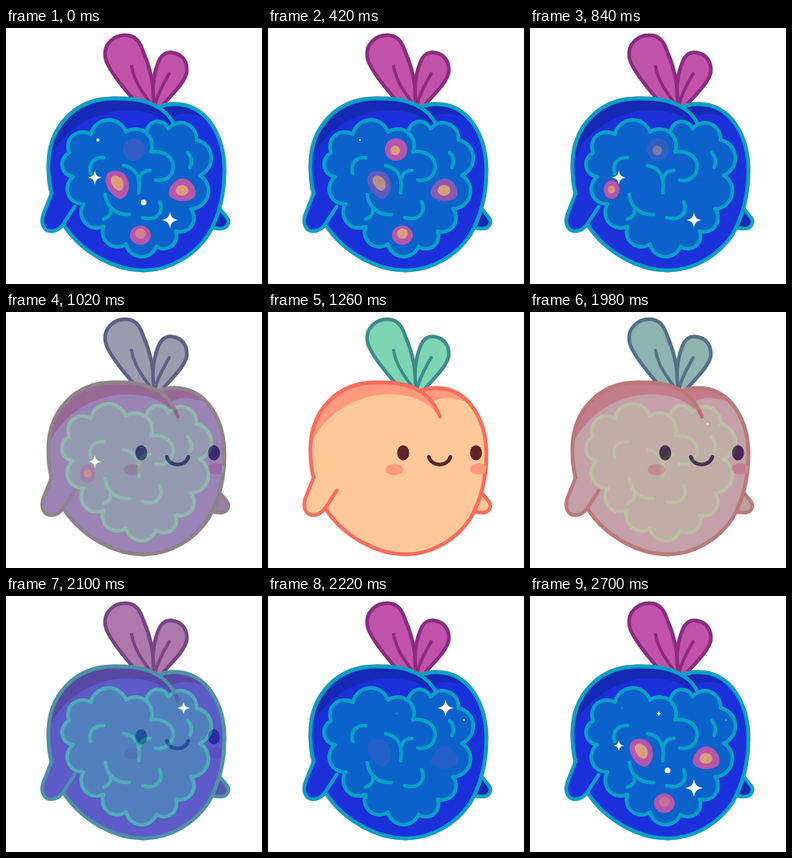
An HTML page that plays this animation: 320x320 px, repeating every 2760 ms.

```html
<!DOCTYPE html>
<html lang="en">
<head>
<meta charset="utf-8">
<title>Peach</title>
<style>
  html, body { margin: 0; width: 100%; height: 100%; overflow: hidden; background: #fff; }
  svg { display: block; width: 100vw; height: 100vh; }
  path { stroke-linecap: round; stroke-linejoin: round; }
</style>
</head>
<body>
<svg id="stage" viewBox="0 0 320 320"></svg>
<script>
const LOOP = 2760, STEP = 60;

const BODY = 'M190 99C172 88 152 88 135 88C85 88 53 125 53 172C53 185 54 196 57 207C60 225 66 238 72 246' +
  'C95 281 136 303 172 303C205 303 236 284 253 258C268 232 273 205 273 178C273 138 253 95 210 95C202 95 195 97 190 99Z';
const ARM = 'M57 207L47 232C42 246 49 254 56 254C63 254 67 251 71 246L86 223';
const FAR_ARM = 'M267 226C273 233 279 239 278 243C276 252 268 252 257 249';
const CREASE = 'M188 98C200 104 209 115 215 131';
const SHADE = 'M54 164C72 126 112 103 150 103C182 103 202 113 214 131L205 113C217 105 232 106 252 114L240 80L40 80Z';
const LEAF = 'M161 91C146 74 126 50 124 36C122 20 135 9 149 9C163 9 168 19 172 31C179 47 185 68 186 98';
const SIDE_LEAF = 'M186 98C182 80 184 60 190 44C194 33 201 29 209 31C221 33 227 43 226 55C223 69 208 82 197 95';
const VEINS = 'M157 48C160 66 170 80 183 97M204 57C198 68 190 80 186 97';
const FOLDS = 'M106 182C102 170 110 161 122 162M147 172C160 174 169 184 166 206M167 188C168 181 174 178 180 178' +
  'M124 208C126 226 140 234 154 233M131 227C131 234 128 237 122 239M192 217C198 230 188 242 171 237' +
  'M227 156C233 162 233 168 230 174';

// Round bumps between neighbouring points
function scallop(points) {
  return points.map(([x, y], i) => {
    if (!i) return `M${x} ${y}`;
    const r = Math.hypot(x - points[i - 1][0], y - points[i - 1][1]) * .52;
    return `A${r} ${r} 0 0 1 ${x} ${y}`;
  }).join('');
}
const BRAIN = scallop([[176, 128], [203, 126], [238, 140], [242, 184], [231, 226], [212, 254], [188, 273], [150, 270],
  [122, 248], [97, 220], [84, 186], [79, 156], [106, 133], [150, 130], [181, 155]]) +
  'C200 152 210 164 209 175C207 187 198 192 187 190';

const PEACH = { skin: '#ffc899', shade: '#ff9a7d', edge: '#f96c5c', leaf: '#7dd6b1', stem: '#3e8a8c', far: '#ffc899' };
const NIGHT = { skin: '#1b30da', shade: '#1529b6', edge: '#06a2c6', leaf: '#c153ab', stem: '#8e2a7e', far: '#1529b6' };
const RIM = '#b755ae', CORE = '#d89f7a', EYE = '#5c2426';

const path = (d, fill = 'none', stroke = 'none', w = 4.5) =>
  `<path d="${d}" fill="${fill}" stroke="${stroke}" stroke-width="${w}"/>`;
const oval = (x, y, rx, ry, fill) => `<ellipse cx="${x}" cy="${y}" rx="${rx}" ry="${ry}" fill="${fill}"/>`;
const inside = (art) => `<g clip-path="url(#inside)">${art}</g>`;

const fruit = (c) =>
  path(LEAF, c.leaf, c.stem) + path(SIDE_LEAF, c.leaf, c.stem) + path(VEINS, 'none', c.stem, 4) +
  path(FAR_ARM, c.far, c.edge) + path(BODY, c.skin) + inside(path(SHADE, c.shade)) +
  path(BODY, 'none', c.edge, 4.8) + path(ARM, c.skin, c.edge) + path(CREASE, 'none', c.edge);

const face =
  inside(oval(158, 197, 11, 7, PEACH.shade) + oval(263, 196, 11, 7, PEACH.shade)) +
  oval(169, 176, 7.5, 9.5, EYE) + oval(260, 176, 7.5, 9.5, EYE) +
  path('M201 181C205 194 224 194 228 181', 'none', EYE, 4.6);

const SPOTS = [
  { from: 2190, to: 540,
    rim: path('M125 186C127 175 150 175 153 192C156 206 147 215 141 213C132 210 122 197 125 186Z', RIM),
    core: path('M131 188C133 182 144 184 147 193C148 202 144 204 140 203C135 201 130 194 131 188Z', CORE) },
  { from: 2190, to: 600,
    rim: path('M203 206C205 194 216 187 222 188C232 190 238 200 237 208C235 219 206 220 203 206Z', RIM),
    core: oval(220, 203, 8, 6.8, CORE) },
  { from: 2460, to: 720, rim: oval(168, 259, 13, 12, RIM), core: oval(168, 257, 6.8, 6.5, CORE) },
  { from: 2705, to: 888, rim: oval(160, 152, 14, 14, RIM), core: oval(159, 153, 6, 6, CORE) },
  { from: 480, to: 1116, rim: oval(102, 202, 10, 11.5, RIM), core: oval(102, 202, 4.6, 5, CORE) }
];

const STAR = path('M0-1C.15-.3.3-.15 1 0C.3.15.15.3 0 1C-.15.3-.3.15-1 0C-.3-.15-.15-.3 0-1Z', '#fff');
const DOT = oval(0, 0, 1, 1, '#fff');
const GLINTS = [
  { art: STAR, x: 111, y: 187, size: 10, peaks: [80, 920] },
  { art: STAR, x: 205, y: 240, size: 11, peaks: [2700, 750] },
  { art: STAR, x: 222, y: 140, size: 10.5, peaks: [2220] },
  { art: STAR, x: 161, y: 147, size: 12, peaks: [2480] },
  { art: DOT, x: 115, y: 140, size: 4.5, peaks: [190] },
  { art: DOT, x: 172, y: 218, size: 3.6, peaks: [2730] },
  { art: DOT, x: 245, y: 155, size: 4.5, peaks: [2455] }
];

const stage = document.getElementById('stage');
stage.innerHTML =
  `<defs><clipPath id="inside"><path d="${BODY}"/></clipPath></defs>` + fruit(PEACH) + face +
  `<g id="night">${fruit(NIGHT)}${path(BRAIN, '#0b62cb', NIGHT.edge)}${path(FOLDS, 'none', NIGHT.edge)}</g>` +
  SPOTS.map(s => `<g class="spot"><g>${s.rim}</g><g>${s.core}</g></g>`).join('') +
  GLINTS.map(g => `<g class="glint">${g.art}</g>`).join('');

const night = document.getElementById('night');
const spots = stage.querySelectorAll('.spot');
const glints = stage.querySelectorAll('.glint');

const clamp = (v) => Math.min(1, Math.max(0, v));
const since = (from, t) => (t - from + LOOP) % LOOP;
const fade = (age, life) => clamp(Math.min(age, life - age) / 240);

function smooth(a, b, t) {
  const p = clamp((t - a) / (b - a));
  return p * p * (3 - 2 * p);
}

function pulse(peak, t) {
  const gap = Math.min(since(peak, t), since(t, peak));
  return Math.cos(Math.PI / 2 * Math.min(1, gap / 270));
}

function draw(t) {
  night.style.opacity = 1 - smooth(820, 1190, t) + smooth(1855, 2235, t);
  SPOTS.forEach((s, i) => {
    const [rim, core] = spots[i].children;
    const age = since(s.from, t), life = since(s.from, s.to);
    rim.style.opacity = fade(age, life);
    core.style.opacity = fade(age - 150, life - 90);
  });
  GLINTS.forEach((g, i) => {
    const size = g.size * Math.max(...g.peaks.map(p => pulse(p, t)));
    glints[i].setAttribute('transform', `translate(${g.x} ${g.y}) scale(${size})`);
  });
}

const start = performance.now();
function tick() {
  const t = (performance.now() - start) % LOOP;
  draw(Math.floor(t / STEP) * STEP);
  requestAnimationFrame(tick);
}
tick();
</script>
</body>
</html>
```
